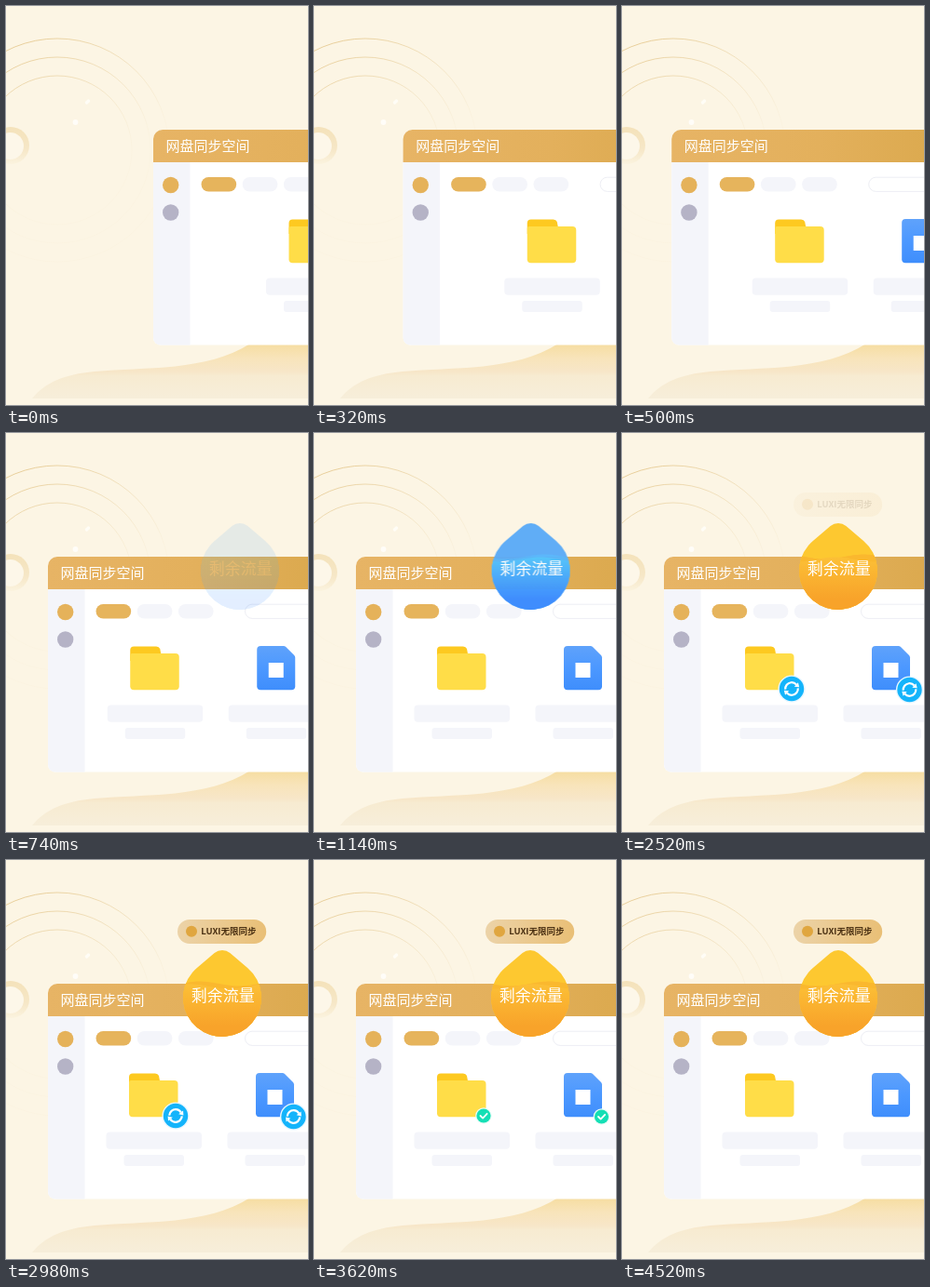
These frames come from a looping animation (324 px wide and 429 px high, 4.8 s). An HTML page with a canvas:

```html
<!DOCTYPE html>
<html lang="zh-CN">
<head>
<meta charset="utf-8">
<title>网盘同步空间</title>
<style>
html, body { margin: 0; width: 100%; height: 100%; overflow: hidden; background: #fcf5e4; }
canvas { display: block; width: 324px; height: 429px; }
</style>
</head>
<body>
<canvas id="stage"></canvas>
<script>
const W = 324, H = 429, LOOP = 4800;
const FONT = '"Noto Sans CJK SC", "Noto Sans CJK", "Noto Sans", sans-serif';
const PALE = '#f4f5fa', GOLD = '#e6b45c';
const BLUE = { top: [92, 171, 246], back: [88, 181, 251], crest: [84, 199, 255], deep: [58, 138, 253] };
const AMBER = { top: [253, 200, 48], back: [250, 184, 46], crest: [252, 192, 54], deep: [248, 163, 42] };

const dpr = window.devicePixelRatio || 1;
const stage = document.getElementById('stage');
const ctx = setup(stage);
const dropLayer = document.createElement('canvas');
const dropCtx = setup(dropLayer);

function setup(canvas) {
  canvas.width = W * dpr;
  canvas.height = H * dpr;
  const c = canvas.getContext('2d');
  c.scale(dpr, dpr);
  return c;
}

// Eased progress of t between two moments
function ease(t, from, to) {
  const p = Math.min(1, Math.max(0, (t - from) / (to - from)));
  return p * p * (3 - 2 * p);
}

const mix = (a, b, k) => a + (b - a) * k;

function gradient(c, x0, y0, x1, y1, stops) {
  const g = c.createLinearGradient(x0, y0, x1, y1);
  stops.forEach(([at, color]) => g.addColorStop(at, color));
  return g;
}

function disc(x, y, r, fill) {
  ctx.beginPath();
  ctx.arc(x, y, r, 0, Math.PI * 2);
  ctx.fillStyle = fill;
  ctx.fill();
}

function box(x, y, w, h, r, fill) {
  ctx.beginPath();
  ctx.roundRect(x, y, w, h, r);
  ctx.fillStyle = fill;
  ctx.fill();
}

function label(c, str, x, y, size, weight, fill) {
  c.font = `${weight} ${size}px ${FONT}`;
  c.fillStyle = fill;
  c.fillText(str, x, y);
}

function drawBackdrop() {
  ctx.fillStyle = '#fcf5e4';
  ctx.fillRect(0, 0, W, H);

  ctx.lineWidth = 1;
  ctx.strokeStyle = gradient(ctx, 35, 35, 115, 170, [
    [0, 'rgba(228,198,138,.8)'], [0.45, 'rgba(232,208,160,.5)'],
    [0.9, 'rgba(236,216,175,.1)'], [1, 'rgba(236,216,175,.06)']]);
  for (const r of [120, 100, 80]) {
    ctx.beginPath();
    ctx.arc(55, 155, r, 0, Math.PI * 2);
    ctx.stroke();
  }

  disc(5, 150, 20, gradient(ctx, 0, 130, 0, 170, [
    [0, '#f4e2ba'], [0.6, '#f6e7c7'], [1, '#fbf3df']]));
  disc(4.5, 150.5, 14.5, '#fdf7e9');

  disc(74.5, 125, 2.9, '#fffdf8');
  ctx.save();
  ctx.translate(87.5, 103);
  ctx.rotate(-Math.PI / 4);
  box(-3, -1.7, 6, 3.4, 1.5, '#fffdf6');
  ctx.restore();

  ctx.beginPath();
  ctx.moveTo(28, 422);
  ctx.bezierCurveTo(42, 405, 62, 396, 95, 393);
  ctx.bezierCurveTo(150, 388, 215, 393, 262, 363);
  ctx.lineTo(W, 363);
  ctx.lineTo(W, 422);
  ctx.fillStyle = gradient(ctx, 0, 364, 0, 422, [
    [0, '#f6dda2'], [0.25, '#f8e4ba'], [0.5, '#f7e6c8'], [0.58, '#f7ebd1'], [1, '#f7eeda']]);
  ctx.fill();
}

function drawPanel(x) {
  box(x, 133, 340, 231.5, [10, 0, 0, 8], '#fff');
  box(x, 160, 39.5, 204.5, [0, 0, 0, 8], PALE);
  box(x, 133, 340, 35, [10, 0, 0, 0],
    gradient(ctx, x, 0, x + 290, 0, [[0, '#e7b465'], [0.55, '#e3b05c'], [1, '#dba94e']]));
  label(ctx, '网盘同步空间', x + 13.6, 156.2, 15, 500, '#fff');

  disc(x + 18.7, 192.5, 8.7, '#e5b25a');
  disc(x + 18.7, 222, 8.7, '#b5b3c6');
  [GOLD, PALE, PALE].forEach((fill, i) => box(x + 51.5 + i * 44.2, 184, 37.7, 15.5, 7.75, fill));

  ctx.beginPath();
  ctx.roundRect(x + 211.5, 184.2, 120, 15.2, 7.6);
  ctx.lineWidth = 1;
  ctx.strokeStyle = '#edeef4';
  ctx.stroke();
}

function drawCaption(x) {
  box(x, 292.5, 102.5, 18.3, 4, PALE);
  box(x + 19, 317, 64.5, 12, 3, PALE);
}

function drawFolder(x) {
  ctx.beginPath();
  ctx.moveTo(x, 245);
  ctx.lineTo(x, 233.5);
  ctx.quadraticCurveTo(x, 229.5, x + 4, 229.5);
  ctx.lineTo(x + 28, 229.5);
  ctx.quadraticCurveTo(x + 31, 229.5, x + 32, 232);
  ctx.lineTo(x + 34.5, 245);
  ctx.fillStyle = '#fdc920';
  ctx.fill();
  box(x, 237, 52.5, 39.3, [2, 4, 4, 4], '#ffdd48');
  drawCaption(x - 24.5);
}

function drawFile(x) {
  ctx.beginPath();
  ctx.moveTo(x + 4, 229);
  ctx.lineTo(x + 28.5, 229);
  ctx.quadraticCurveTo(x + 30, 229, x + 31, 230);
  ctx.lineTo(x + 40, 239);
  ctx.quadraticCurveTo(x + 41, 240, x + 41, 241.5);
  ctx.arcTo(x + 41, 276.3, x + 30, 276.3, 4);
  ctx.arcTo(x, 276.3, x, 260, 4);
  ctx.arcTo(x, 229, x + 8, 229, 4);
  ctx.fillStyle = gradient(ctx, 0, 229, 0, 276, [[0, '#5fa2fb'], [0.5, '#4c98ff'], [1, '#3f8efc']]);
  ctx.fill();
  box(x + 12.5, 247, 16, 16, 0, '#fff');
  drawCaption(x - 30.5);
}

function dropPath(c) {
  const cx = 232, cy = 148, r = 42, reach = 55;
  const a = Math.acos(r / reach);
  c.beginPath();
  c.arc(cx, cy, r, -Math.PI / 2 + a, -Math.PI / 2 - a);
  c.arcTo(cx, cy - reach, cx + r * Math.sin(a), cy - r * Math.cos(a), 13);
  c.closePath();
}

function wave(c, level, height, phase) {
  c.beginPath();
  c.moveTo(188, 192);
  for (let x = 188; x <= 276; x += 2) {
    c.lineTo(x, level + height * Math.sin((x - 188) / 84 * Math.PI * 2 + phase));
  }
  c.lineTo(276, 192);
  c.fill();
}

function drawDrop(t) {
  const show = ease(t, 600, 1200);
  if (!show) return;
  const turn = ease(t, 2080, 2520);
  const tone = name =>
    `rgb(${BLUE[name].map((v, i) => Math.round(mix(v, AMBER[name][i], turn))).join(',')})`;
  const phase = Math.min(t, 3620) / 1200 * Math.PI * 2;
  const c = dropCtx;

  c.clearRect(0, 0, W, H);
  c.save();
  dropPath(c);
  c.fillStyle = tone('top');
  c.fill();
  c.clip();
  c.fillStyle = tone('back');
  wave(c, 133, 2.5, -phase);
  c.fillStyle = gradient(c, 0, 133, 0, 190, [[0, tone('crest')], [0.8, tone('deep')], [1, tone('deep')]]);
  wave(c, 136, 2.5, phase + 1);
  c.restore();
  label(c, '剩余流量', 198.8, 152.4, 17, 500, '#fff');

  ctx.globalAlpha = show;
  ctx.drawImage(dropLayer, 22 * (1 - show), 0, W, H);
  ctx.globalAlpha = 1;
}

function drawBadge(t) {
  ctx.globalAlpha = ease(t, 2400, 2960);
  box(184, 64, 95.2, 26, 13, gradient(ctx, 184, 0, 279, 0, [[0, '#ecd3a8'], [1, '#e9bf76']]));
  disc(199, 76.7, 6, '#e0a63f');
  label(ctx, 'LUXI无限同步', 209.3, 80, 9.5, 700, '#4a3012');
  ctx.globalAlpha = 1;
}

function scaled(x, y, k, draw) {
  if (k <= 0) return;
  ctx.save();
  ctx.translate(x, y);
  ctx.scale(k, k);
  draw();
  ctx.restore();
}

function syncMark(angle) {
  disc(0, 0, 14.6, '#e6f6ff');
  disc(0, 0, 13.2, '#14b4fb');
  ctx.rotate(angle);
  ctx.strokeStyle = ctx.fillStyle = '#fff';
  ctx.lineWidth = 2.2;
  for (let i = 0; i < 2; i++) {
    ctx.beginPath();
    ctx.arc(0, 0, 6.8, Math.PI * 1.06, Math.PI * 1.86);
    ctx.stroke();
    ctx.beginPath();
    ctx.moveTo(3.4, -1.4);
    ctx.lineTo(8.6, -4.4);
    ctx.lineTo(8.4, 0.6);
    ctx.fill();
    ctx.rotate(Math.PI);
  }
}

function doneMark() {
  disc(0, 0, 8.8, '#e9fcf7');
  disc(0, 0, 7.6, '#14dfb5');
  ctx.beginPath();
  ctx.moveTo(-3.5, 0);
  ctx.lineTo(-0.9, 2.6);
  ctx.lineTo(3.6, -2.2);
  ctx.strokeStyle = '#fff';
  ctx.lineWidth = 1.8;
  ctx.lineCap = ctx.lineJoin = 'round';
  ctx.stroke();
}

function drawMarks(t) {
  const sync = ease(t, 2040, 2220) * (1 - ease(t, 3280, 3440));
  const done = t < 4520 ? ease(t, 3430, 3620) : 0;
  const angle = ease(t, 2040, 3240) * Math.PI * 2 + Math.PI * 1.2;
  for (const [x, y] of [[182, 275], [308.5, 276]]) {
    scaled(x, y, sync, () => syncMark(angle));
    scaled(x, y, done, doneMark);
  }
}

function render(t) {
  const panelX = mix(158, 45, ease(t, 0, 600));
  const itemX = panelX + mix(145.5, 87, ease(t, 120, 800));
  drawBackdrop();
  drawPanel(panelX);
  drawFolder(itemX);
  drawFile(itemX + 136);
  drawDrop(t);
  drawBadge(t);
  drawMarks(t);
}

const start = performance.now();
function tick() {
  render((performance.now() - start) % LOOP);
  requestAnimationFrame(tick);
}
tick();
</script>
</body>
</html>
```
